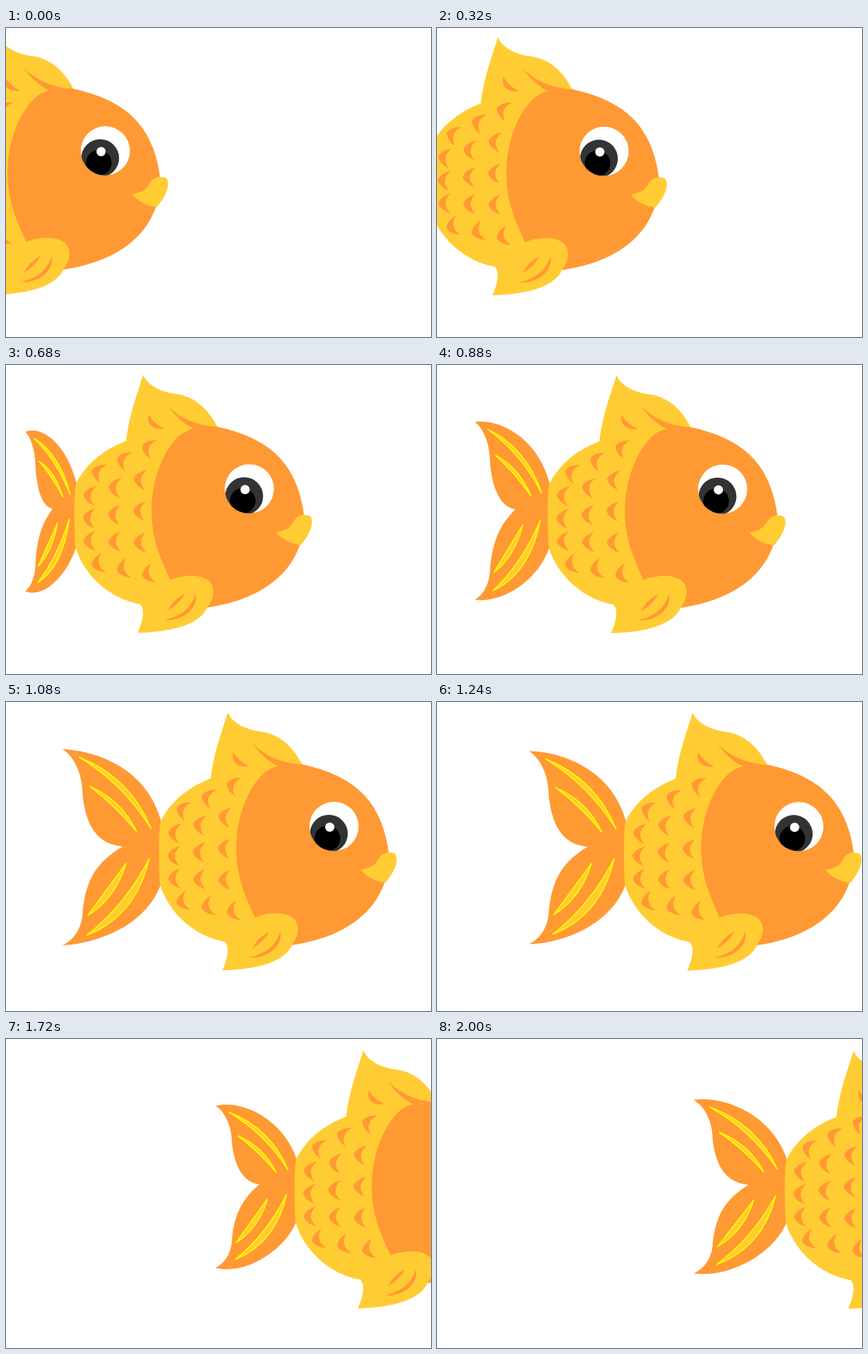
An HTML page for the animation above (2040 ms loop, 550 by 400 pixels).

```html
<!DOCTYPE html>
<html lang="en">
<head>
<meta charset="utf-8">
<title>Goldfish</title>
<style>
  html, body { margin: 0; width: 100%; height: 100%; overflow: hidden; background: #fff; }
  svg { display: block; width: 550px; height: 400px; }
  .orange { fill: #f93; }
  .gold { fill: #fc3; }
</style>
</head>
<body>
<svg viewBox="0 0 550 400">
  <defs>
    <clipPath id="eyeball"><circle cx="424.5" cy="161" r="32"/></clipPath>
  </defs>
  <g id="fish">
    <path id="tail" class="orange"/>
    <path id="stripes" class="gold" stroke="#ff0" stroke-width="1.4"/>
    <path class="gold" d="M287,13.5 C293,28 312,36 328,38 C355,41 372,59 384,82 L372,290 L300,311 L281,310
      C236,301 206,264 199,234 C198,215 197,170 200,155 C211,132 232,112 265,99 C269,66 277,46 287,13.5 Z"/>
    <g id="scales" class="orange"></g>
    <path class="orange" d="M294,65 C291,78 300,85 315,83 Q303,79 294,65 Z"/>
    <path class="orange" d="M319,54 Q345,79 384,81 L354,84 Q335,76 319,54 Z"/>
    <path class="orange" d="M384,81 C448,95 488,126 496,200 C494,262 448,304 368,315 L322,279
      C312,255 298,230 298,190 C298,150 312,115 330,96 C340,85 355,79 384,81 Z"/>
    <path class="gold" d="M281,309 C289,313 289,328 280,347.5 C330,346 362,335 371,313
      C379,303 381,288 372,280 C360,270 335,273 322,279 L300,290 Z"/>
    <path class="orange" d="M319,319 Q325,305 341,297 Q334,310 319,319 Z"/>
    <path class="orange" d="M315,331 C340,332 359,315 355,297 C348,318 335,325 315,331 Z"/>
    <path class="gold" d="M459,217 C471,215 477,212 482,203 C487,194 498,193 504,197 C508,205 505,217 491,234
      C478,232 467,227 459,217 Z"/>
    <g clip-path="url(#eyeball)">
      <circle cx="424.5" cy="161" r="32" fill="#fff"/>
      <circle cx="417.8" cy="170.5" r="24.5" fill="#333"/>
      <circle cx="416" cy="176.5" r="16.5"/>
      <circle cx="419" cy="162" r="6" fill="#fff"/>
    </g>
  </g>
</svg>
<script>
const STEP = 40, STEPS = 51;
const BASE_STEP = 27;           // step at which the fish sits at its drawn position
const BODY_LEFT = 198, TAIL_MID = 187, WIDEST = 127;
const $ = id => document.getElementById(id);
const mix = (a, b, k) => a + (b - a) * k;

// Three columns of five scales, bowed and fanned out towards the ends.
function drawScales() {
  let out = '';
  for (let col = 0; col < 3; col++) {
    for (let row = -2; row <= 2; row++) {
      const x = 209 + 32.5 * col + .7 * row ** 4;
      const y = 199 - 4.7 * col + (29.5 + 5.6 * col) * row;
      const tilt = 3 - 3 * row - 1.3 * row ** 3;
      out += `<path transform="translate(${x} ${y}) rotate(${tilt} 10 0)"
        d="M16,-13 Q3,-9 0,0 Q3,9 16,13 Q3,0 16,-13Z"/>`;
    }
  }
  $('scales').innerHTML = out;
}

// The tail opens evenly, closes with a slow start, and opens again.
const beats = [
  { at: 14, length: 45, spread: 96 },
  { at: 27, length: 125, spread: WIDEST },
  { at: 44, length: 100, spread: 102.5 },
  { at: 51, length: 121, spread: 114 }
];

function tailPose(step) {
  const i = Math.max(1, beats.findIndex(b => b.at >= step));
  const a = beats[i - 1], b = beats[i];
  const t = Math.max(0, (step - a.at) / (b.at - a.at));
  const k = b.length < a.length ? t ** 1.7 : t;
  return { length: mix(a.length, b.length, k), spread: mix(a.spread, b.spread, k) };
}

function drawTail(step) {
  const { length, spread } = tailPose(step);
  const closed = WIDEST - spread;
  const middle = 188 + closed * .1;
  const notch = Math.min(47, length * .445);
  const curl = closed / 200;

  // u: share of the tail length, v: 0 at the outer tip, 1 at the middle line
  const plot = edge => (u, v) =>
    `${(BODY_LEFT + u * length).toFixed(2)},${mix(edge, TAIL_MID, v).toFixed(2)} `;
  const up = plot(middle - spread), down = plot(middle + spread);

  const lobe = (p, joinY, cusp, hug) =>
    `M${p(-1, 0)}C${p(-.62, .02 - curl)}${p(-.12, .21)}${BODY_LEFT + 3},${joinY}` +
    `L${BODY_LEFT + 12},${TAIL_MID}L${BODY_LEFT - notch},${TAIL_MID}` +
    `C${p(-.61, hug)}${p(-.75, hug - .15)}${p(-.79, cusp)}` +
    `C${p(-.79, cusp * .6)}${p(-.86, cusp * .18)}${p(-1, 0)}Z`;

  // A sliver from (u1, v1) to (u2, v2) whose two edges bow outwards
  const stripe = (p, u1, v1, u2, v2, outer, inner) => {
    const bow = d => p((u1 + u2) / 2 + d, (v1 + v2) / 2 - d);
    return `M${p(u1, v1)}Q${bow(outer)}${p(u2, v2)}Q${bow(inner)}${p(u1, v1)}Z`;
  };

  $('tail').setAttribute('d', lobe(up, 155, .48, .98) + lobe(down, 234, .35, .86));
  $('stripes').setAttribute('d',
    stripe(up, -.83, .08, -.08, .82, .16, .09) +
    stripe(up, -.72, .38, -.23, .85, .09, .03) +
    stripe(down, -.34, .83, -.74, .3, .09, 0) +
    stripe(down, -.1, .88, -.75, .1, .19, .08));
}

function render(ms) {
  const step = Math.floor(ms / STEP) % STEPS;
  const moved = step - BASE_STEP;
  $('fish').setAttribute('transform', `translate(${moved * 10.96} ${moved * .075})`);
  drawTail(step);
}

drawScales();
const start = performance.now();
function tick() {
  render(performance.now() - start);
  requestAnimationFrame(tick);
}
tick();
</script>
</body>
</html>
```
